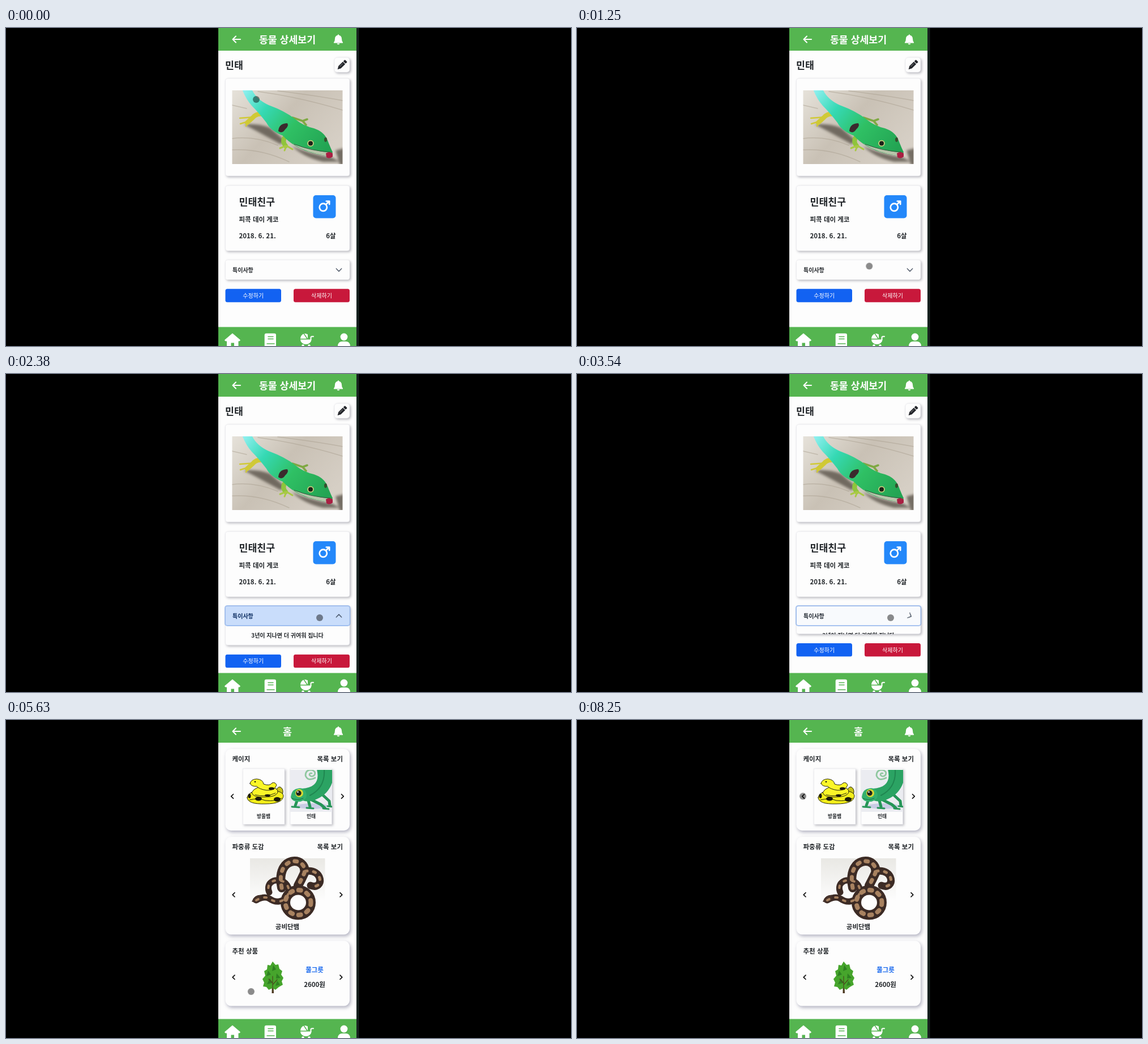
An HTML page that plays this animation: 998 px wide and 561 px high, repeating every 8.29 s.

```html
<!DOCTYPE html>
<html lang="ko">
<head>
<meta charset="utf-8">
<title>동물 상세보기</title>
<style>
  html, body { margin: 0; width: 100%; height: 100%; overflow: hidden; background: #000; }
  svg { display: block; width: 100%; height: 100%; }
  text { font: 700 11.5px "Noto Sans CJK KR", "Noto Sans CJK", "Noto Sans", sans-serif; fill: #212529; }
  .big { font-size: 17.3px; }
  .mid { font-size: 10px; }
  .tiny { font-size: 8.7px; }
  .white { fill: #fff; }
  .btn { font-size: 10px; font-weight: 400; fill: #fff; }
  .c { text-anchor: middle; }
  .e { text-anchor: end; }
  .card { fill: #fdfdfd; stroke: #e4e4ea; stroke-width: .6; filter: drop-shadow(2px 2.5px 2px rgba(40, 40, 60, .32)); }
  .soft { fill: #fdfdfd; filter: drop-shadow(2px 3px 3px rgba(45, 45, 85, .36)); }
  .line { fill: none; stroke-linecap: round; stroke-linejoin: round; }
  .blur { filter: blur(2px); }

  #detail, #home, .head, .headText, .arrow, .grow, .push, .ring, .dot {
    animation: 8290ms linear infinite;
  }
  #detail { animation-name: leave; animation-timing-function: step-end; }
  #home { animation-name: enter; animation-timing-function: step-end; }
  @keyframes leave { 0% { visibility: visible } 63.93%, 100% { visibility: hidden } }
  @keyframes enter { 0% { visibility: hidden } 63.93%, 100% { visibility: visible } }

  /* accordion: opens at 1650 ms, closes at 3425 ms */
  .box { animation-name: box; }
  .fold { animation-name: fold; }
  @keyframes box {
    0%, 19.9% { height: 34.5px; animation-timing-function: ease }
    24.13%, 41.31% { height: 69px; animation-timing-function: ease }
    45.54%, 100% { height: 34.5px }
  }
  @keyframes fold {
    0%, 19.9% { height: 0; animation-timing-function: ease }
    24.13%, 41.31% { height: 34.5px; animation-timing-function: ease }
    45.54%, 100% { height: 0 }
  }
  .push { animation-name: push; }
  @keyframes push {
    0%, 19.9% { transform: translateY(0); animation-timing-function: ease }
    24.13%, 41.31% { transform: translateY(34.5px); animation-timing-function: ease }
    45.54%, 100% { transform: translateY(0) }
  }
  .head { animation-name: head; }
  @keyframes head {
    0%, 19.9% { fill: #fdfdfd; animation-timing-function: ease-in-out }
    21.71%, 41.31% { fill: #c9ddfb; animation-timing-function: ease-in-out }
    43.12%, 100% { fill: #fdfdfd }
  }
  .headText { animation-name: headText; }
  @keyframes headText {
    0%, 19.9% { fill: #212529; animation-timing-function: ease-in-out }
    21.71%, 41.31% { fill: #0b2c60; animation-timing-function: ease-in-out }
    43.12%, 100% { fill: #212529 }
  }
  .arrow { animation-name: arrow; stroke: #263244; stroke-width: 1.1; }
  @keyframes arrow {
    0%, 19.9% { transform: translate(588px, 426.7px) rotate(0deg); animation-timing-function: ease-in-out }
    22.32%, 41.31% { transform: translate(588px, 426.7px) rotate(-180deg); animation-timing-function: ease-in-out }
    43.73%, 100% { transform: translate(588px, 426.7px) rotate(0deg) }
  }
  .ring { animation-name: ring; fill: none; stroke: #7ba7ea; stroke-opacity: .65; stroke-width: 2; }
  @keyframes ring {
    0%, 19.9% { opacity: 0 }
    21.71%, 100% { opacity: 1 }
  }

  .dot { animation-name: dot; fill: rgba(0, 0, 0, .45); }
  @keyframes dot {
    0%, 7.6% { transform: translate(442px, 126px); animation-timing-function: ease-in-out }
    15.08% { transform: translate(516px, 420px); animation-timing-function: ease-out }
    17.5%, 52% { transform: translate(554px, 430px); animation-timing-function: ease-in-out }
    61.28%, 64.4% { transform: translate(407px, 548px); animation-timing-function: ease-in }
    67.91% { transform: translate(433px, 480px); animation-timing-function: ease-out }
    77.2%, 100% { transform: translate(399px, 134.5px) }
  }
</style>
</head>
<body>
<svg viewBox="0 0 998 561">
  <defs>
    <linearGradient id="skin" x1="420" y1="110" x2="560" y2="220" gradientUnits="userSpaceOnUse">
      <stop offset="0" stop-color="#8ff0f0"/><stop offset=".28" stop-color="#35d9b4"/>
      <stop offset=".6" stop-color="#2fc064"/><stop offset="1" stop-color="#23a453"/>
    </linearGradient>
    <linearGradient id="wood" x1="0" y1="0" x2="1" y2=".6">
      <stop offset="0" stop-color="#e6e2da"/><stop offset=".5" stop-color="#c9c1b5"/>
      <stop offset="1" stop-color="#d6cfc5"/>
    </linearGradient>
    <linearGradient id="wall" x1="0" y1="0" x2="0" y2="1">
      <stop offset="0" stop-color="#e9e8e4"/><stop offset=".7" stop-color="#fdfdfd"/>
    </linearGradient>
    <clipPath id="photo"><rect x="399.5" y="110" width="195" height="130"/></clipPath>
    <clipPath id="tile"><rect x="502" y="88" width="74" height="74"/></clipPath>
    <clipPath id="body"><rect class="grow fold" x="387" y="443.7" width="221" height="0"/></clipPath>
    <path id="prev" class="line" d="M2-3.7L-1.8 0 2 3.7" stroke="#111" stroke-width="1.7"/>
    <path id="next" class="line" d="M-2-3.7L1.8 0-2 3.7" stroke="#111" stroke-width="1.7"/>
    <path id="tail" d="M528 267C560 260 563 301 538 292"/>
    <path id="loop" d="M487 296C475 237 533 240 527 270Q522 281 516 292"/>
    <ellipse id="coil" cx="516" cy="322" rx="22.5" ry="22"/>
    <path id="neck" d="M442 318Q456 310 465 315C490 333 513 300 490 285C470 278 459 290 465 304"/>
  </defs>

  <rect x="619" width="4.5" height="561" fill="#17211f"/>
  <rect x="375" width="244" height="561" fill="#fdfdfd"/>

  <g fill="#55b550">
    <rect x="375" width="244" height="40"/>
    <rect x="375" y="527.5" width="244" height="34"/>
  </g>
  <g fill="#fff">
    <path class="line" d="M406 14.5L400.5 20 406 25.5M400.5 20H414" stroke="#fff" stroke-width="2.1"/>
    <path d="M587 11.2q1.2 0 1.2 1.5c3.2.6 4.8 3 4.8 6.3q0 4 2 6.2v1.3h-16v-1.3q2-2.2 2-6.2c0-3.3 1.6-5.7 4.8-6.3q0-1.5 1.2-1.5zM584.7 27.3h4.6a2.3 2 0 0 1-4.6 0z"/>
    <path d="M400 539L413.5 550.5 412.5 552H410V563H403.5V555H397V563H390.5V552H387.5L386.5 550.5Z" stroke="#fff" stroke-linejoin="round"/>
    <rect x="456.7" y="538.7" width="20.3" height="26" rx="3"/>
    <path class="line" d="M463 544.5H472M463 548.5H472M461 557H474" stroke="#55b550" stroke-width="1.5"/>
    <path d="M520 549.5H539.5A9.7 8.5 0 0 1 520 549.5ZM520 548A10 10 0 0 1 525.5 539.5L531 548ZM527 539A10 10 0 0 1 533 540.5V548Z"/>
    <path class="line" d="M538.5 550V546.5Q538.5 544.3 540.5 544.3H543" stroke="#fff" stroke-width="2"/>
    <circle cx="524.5" cy="560.5" r="2.2"/><circle cx="535.5" cy="560.5" r="2.2"/>
    <circle cx="597" cy="545" r="6.4"/>
    <path d="M586 562Q586 553 594 553H600Q608 553 608 562Z"/>
  </g>

  <g id="detail">
    <text class="big white c" x="497" y="27.3">동물 상세보기</text>
    <text class="big" x="387" y="71.7">민태</text>

    <rect class="card" x="580" y="52" width="27" height="26" rx="5"/>
    <g transform="translate(593.3 65.3) rotate(45)" fill="#24262b">
      <rect x="-3" y="-10.5" width="6" height="4.2" rx="1.3"/>
      <path d="M-3-5.3H3V5.5L0 10.8-3 5.5Z"/>
      <path d="M-.8-3V4.5" stroke="#aaa" stroke-width=".8"/>
    </g>

    <rect class="card" x="387.5" y="89" width="219.5" height="172" rx="4"/>
    <g clip-path="url(#photo)">
      <rect x="399" y="110" width="196" height="130" fill="url(#wood)"/>
      <g class="line" stroke="#a89d8e" stroke-opacity=".5" stroke-width="1.5">
        <path d="M445 112Q520 122 595 145M480 111Q540 118 595 128M399 195Q440 190 480 207M399 215Q450 212 500 236M399 136L425 142"/>
      </g>
      <g class="blur" fill="#4b443b" opacity=".7">
        <path d="M420 170Q445 168 466 176L492 198 485 205Q455 188 420 170Z"/>
        <path d="M505 208Q535 222 575 228L590 236H560Q525 228 505 208Z"/>
        <path d="M582 216L597 212V242H590Z"/>
      </g>
      <g class="line" stroke="#d0c936">
        <path d="M464 155Q445 147 436 158L426 167" stroke-width="8"/>
        <path d="M440 157L413 159M430 164L414 169M428 166L424 173" stroke-width="2.5"/>
        <path d="M493 192Q487 200 494 208" stroke="#8fc43c" stroke-width="8"/>
        <path d="M494 208L484 212M495 209L492 216M496 208L506 214" stroke="#a9c944" stroke-width="3"/>
        <path d="M506 158L524 164 532 161M524 164L530 171" stroke="#7fa843" stroke-width="3.5"/>
      </g>
      <path d="M417 108H434Q442 126 464 136Q494 147 511 161Q526 173 544 177Q562 183 568 198Q573 211 577 219Q575 226 564 225Q536 221 517 211Q501 203 489 190Q467 181 460 167Q447 150 434 137Q424 126 417 108Z" fill="url(#skin)"/>
      <path d="M506 204Q532 215 574 220Q575 226 564 225Q530 220 506 204Z" fill="#b7c5aa"/>
      <path d="M509 205Q540 217 573 219" class="line" stroke="#31543b"/>
      <path d="M481 182Q482 168 497 168Q500 173 493 179Q488 187 481 182Z" fill="#3b2a2d"/>
      <circle cx="538" cy="203.5" r="5.8" fill="#c8cf7d"/><circle cx="538" cy="203.5" r="4" fill="#1c2119"/>
      <ellipse cx="564.5" cy="197" rx="2.5" ry="4" fill="#35502e"/>
      <path d="M565 221Q571 217 577 221L577 227Q571 232 566 228Z" fill="#a91f42"/>
    </g>

    <rect class="card" x="387.5" y="278" width="219.5" height="115" rx="4"/>
    <text class="big" x="411.5" y="312.8">민태친구</text>
    <text x="411.5" y="341.8">피콕 데이 게코</text>
    <text x="411.5" y="371.3">2018. 6. 21.</text>
    <text class="e" x="582.5" y="371.3">6살</text>
    <rect x="542.5" y="295" width="40" height="40.5" rx="5" fill="#2488fa"/>
    <g class="line" stroke="#fff" stroke-width="2.7">
      <circle cx="560.3" cy="316.3" r="6.6"/>
      <path d="M565 311.5L570.8 305.7M565.8 305.5H571.2V311"/>
    </g>

    <rect class="card grow box" x="387.5" y="409.2" width="219.5" height="34.5" rx="4"/>
    <rect class="head" x="388" y="409.7" width="218.5" height="34" rx="3.5"/>
    <rect class="ring" x="387" y="408.9" width="220.5" height="35" rx="4"/>
    <text class="mid headText" x="400" y="430.5">특이사항</text>
    <path class="line arrow" d="M-4.8-2.3L0 2.5 4.8-2.3"/>
    <g clip-path="url(#body)"><text class="mid c" x="497" y="464.8">3년이 지나면 더 귀여워 집니다</text></g>
    <g class="push">
      <rect x="387.5" y="460.3" width="98.5" height="23.5" rx="3.5" fill="#1262f2"/>
      <rect x="508" y="460.3" width="99" height="23.5" rx="3.5" fill="#c8183b"/>
      <text class="btn c" x="436.7" y="475.8">수정하기</text>
      <text class="btn c" x="557.5" y="475.8">삭제하기</text>
    </g>
  </g>

  <g id="home">
    <text class="big white c" x="497" y="27">홈</text>
    <rect class="soft" x="387.5" y="51" width="219.5" height="144" rx="10"/>
    <rect class="soft" x="387.5" y="206" width="219.5" height="172.5" rx="10"/>
    <rect class="soft" x="387.5" y="389.5" width="219.5" height="115" rx="10"/>

    <text x="399.5" y="73.3">케이지</text>
    <text class="e" x="595" y="73.3">목록 보기</text>
    <rect class="card" x="418.5" y="86" width="73.5" height="98"/>
    <rect class="card" x="502" y="86" width="73.5" height="98"/>
    <text class="tiny c" x="455" y="173.3">방울뱀</text>
    <text class="tiny c" x="539" y="173.3">민태</text>

    <g class="line" stroke="#26250c">
      <path d="M476 131Q478 117 484 118Q490 121 489 128Q489 136 480 136Z" fill="#c9c51c"/>
      <path d="M426 137Q428 124 458 123Q490 124 490 134Q489 148 458 148Q427 149 426 137Z" fill="#f3ee1a"/>
      <path d="M434 128Q440 116 460 118Q482 118 480 128Q476 136 456 136Q436 137 434 128Z" fill="#fbf628"/>
      <path d="M431 112Q433 104 443 104Q454 105 455 113Q466 117 470 111Q476 109 478 115Q474 125 460 124Q447 122 443 117Q434 118 431 112Z" fill="#fbf628"/>
      <path d="M430 141Q446 137 458 142Q476 144 487 138M440 132Q458 137 476 129"/>
    </g>
    <g fill="#1b1a0c">
      <ellipse cx="446" cy="139" rx="6" ry="3.5"/><ellipse cx="479" cy="140" rx="6" ry="4"/>
      <ellipse cx="469" cy="121" rx="5" ry="2.5"/><ellipse cx="430" cy="134" rx="2.5" ry="4"/>
      <ellipse cx="462" cy="133" rx="5" ry="2"/><circle cx="440" cy="109" r="1.3"/>
    </g>

    <g clip-path="url(#tile)">
      <rect x="502" y="88" width="74" height="74" fill="#ebecf1"/>
      <ellipse cx="541" cy="152" rx="28" ry="5" fill="#c9cce4"/>
      <g class="line" stroke="#259557">
        <path d="M538 140L556 149 563 155M515 140L511 151M533 138L537 153M557 130L571 143 572 151" stroke-width="5"/>
        <path d="M505 153L518 154M531 155L543 156M560 156L570 157M568 152L577 153" stroke-width="3"/>
      </g>
      <path d="M549 87H580Q579 126 550 139Q532 148 519 139L523 121Q557 119 549 87Z" fill="#2ba363"/>
      <path d="M562 88Q564 119 537 133" class="line" stroke="#1f8650" stroke-width="2"/>
      <path d="M503 136Q505 122 515 121Q526 118 530 128Q534 140 520 144Q505 145 503 136Z" fill="#34b06d"/>
      <path class="line" d="M546 102Q533 109 529 98Q529 88 539 88Q548 90 545 97Q540 102 536 97Q536 93 540 94" stroke="#8fc79f" stroke-width="2.7"/>
      <circle cx="518" cy="129" r="7" fill="#d9d932"/><circle cx="517" cy="129" r="4.7" fill="#20251f"/>
      <circle cx="515.5" cy="127" r="1.3" fill="#fff"/>
      <path class="line" d="M505 138Q514 143 525 138" stroke="#176c40"/>
    </g>
    <use href="#prev" x="399.5" y="134.7"/><use href="#next" x="594.5" y="134.7"/>

    <text x="399.5" y="228.3">파충류 도감</text>
    <text class="e" x="595" y="228.3">목록 보기</text>
    <rect x="431" y="244" width="132.5" height="108" fill="url(#wall)"/>
    <g class="line" stroke="#3c2b25">
      <use href="#tail" stroke-width="13"/>
      <use href="#loop" stroke-width="16"/>
      <use href="#coil" stroke-width="17"/>
      <use href="#neck" stroke-width="11"/>
      <path d="M435 320Q438 309 450 309L451 318Q442 325 435 320Z" fill="#46322a"/>
    </g>
    <g class="line" stroke="#a88260" stroke-dasharray="4 11">
      <use href="#tail" stroke-width="5"/>
      <use href="#loop" stroke-width="7"/>
      <use href="#coil" stroke-width="8"/>
      <use href="#neck" stroke-width="4"/>
    </g>
    <text class="c" x="497" y="368.6">공비단뱀</text>
    <use href="#prev" x="402" y="308.3"/><use href="#next" x="592" y="308.3"/>

    <text x="399.5" y="411.5">추천 상품</text>
    <path d="M470 455L469.5 482H473L472 455Z" fill="#4a351f"/>
    <path d="M471 426L476 432 481 431 483 439 488 443 486 449 490 455 487 461 489 467 482 471 476 476 471 473 464 476 460 471 454 470 456 463 453 457 458 451 456 443 461 440 462 432 467 433Z" fill="#46a52c"/>
    <path d="M472 432L477 440 470 443ZM463 442L468 449 460 452ZM478 447L485 455 477 456ZM466 456L471 464 461 466ZM479 460L484 467 476 469Z" fill="#2e8121"/>
    <path class="line" d="M471 478V452M471 464L464 457M471 467L479 458" stroke="#4a4a1f" stroke-width="1.2"/>
    <text class="c" x="545" y="445.3" style="fill:#1768ee">물그릇</text>
    <text class="c" x="545" y="471.3">2600원</text>
    <use href="#prev" x="402" y="453.8"/><use href="#next" x="592" y="453.8"/>
  </g>

  <circle class="dot" r="6"/>
</svg>
</body>
</html>
```
